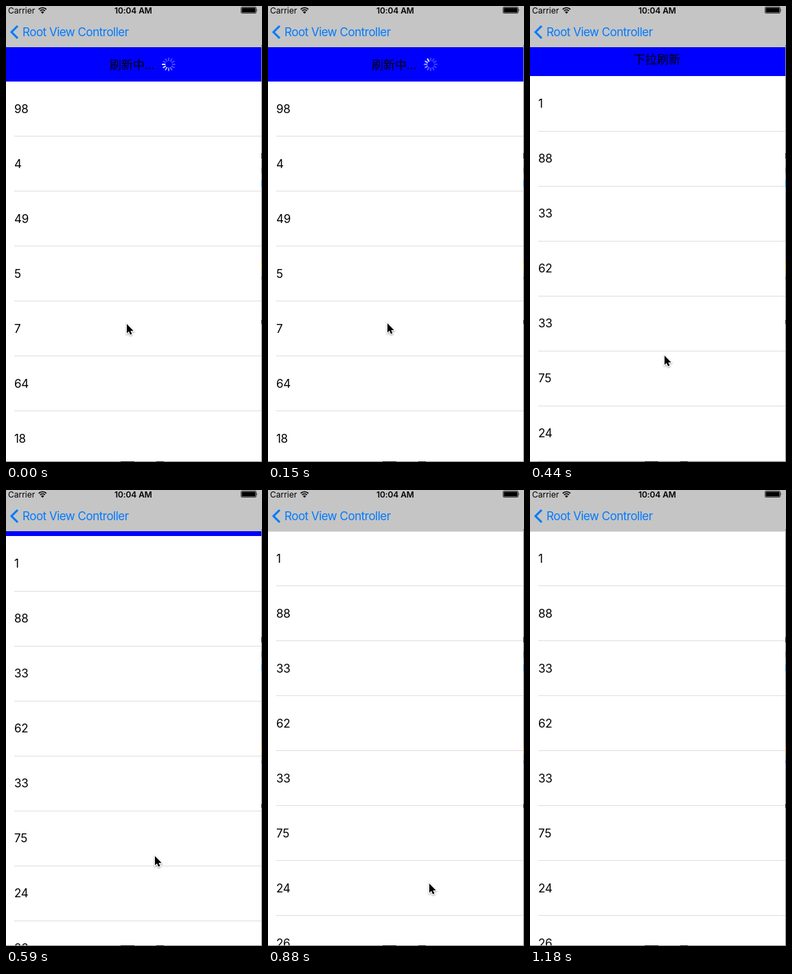
Write an HTML page that moves like this. It is 373 px wide and 664 px high and loops after 8000 ms.

```html
<!DOCTYPE html>
<html lang="en">
<head>
<meta charset="utf-8">
<title>Pull to refresh</title>
<style>
  html, body { margin: 0; width: 100%; height: 100%; overflow: hidden; }
  #stage { position: relative; width: 373px; height: 664px; overflow: hidden; background: #fff; color: #000; font: 17px/20px Inter, sans-serif; }
  #stage * { position: absolute; white-space: nowrap; box-sizing: border-box; }
  .anim, .list, .lines, .pull, .busy, .idle, .spin, .cursor { animation: 8s step-end infinite; }

  .view { left: 0; top: 60px; width: 372px; height: 603px; overflow: hidden; background: #00f; }
  .list, .lines { left: 0; top: 0; width: 372px; height: 720px; }
  .list { background: #fff; animation-name: scroll; }
  .lines { background: repeating-linear-gradient(#0000 0 79px, #dedee0 79px 80px); left: 12px; animation-name: lines; }
  .list div { left: 12px; letter-spacing: -.3px; }
  .old { animation: before 8s step-end infinite; }
  .new { animation: after 8s step-end infinite; }
  .pull { left: 0; top: -35px; width: 372px; height: 20px; animation-name: scroll; font-family: "Noto Sans CJK SC", "Noto Sans CJK", sans-serif; }
  .pull span { left: 151px; }
  .busy { animation-name: before; }
  .idle { animation-name: after; }
  .spin { left: 226px; top: -1px; width: 22px; height: 22px; animation-name: spin; }

  .nav { left: 0; top: 0; width: 373px; height: 60px; background: #c5c5c5; }
  .nav::after { content: ""; position: absolute; left: 0; top: 60px; width: 372px; height: 1px; background: #0002; }
  .back { left: 24px; top: 28px; color: #007aff; letter-spacing: -.5px; }
  .status { top: -1px; font-size: 12px; line-height: 15px; }
  .time { left: 158px; font-weight: 600; letter-spacing: -.1px; }
  .icons { left: 0; top: 0; }

  .cursor { left: 0; top: 0; overflow: visible; animation-name: move; }

  @keyframes scroll {
    0% { transform: translateY(50px); }
    5.5% { transform: translateY(42px); }
    7.375% { transform: translateY(7px); }
    9.125%, 100% { transform: none; }
  }
  @keyframes lines {
    0% { transform: translateY(50px); }
    5.5% { transform: translateY(43px); }
    7.375% { transform: translateY(8px); }
    9.125%, 100% { transform: none; }
  }
  @keyframes before { 0% { visibility: visible; } 5.5%, 100% { visibility: hidden; } }
  @keyframes after { 0% { visibility: hidden; } 5.5%, 100% { visibility: visible; } }
  @keyframes spin {
    0% { transform: rotate(270deg); }
    1.875% { transform: rotate(330deg); }
    3.625%, 100% { transform: rotate(420deg); }
  }
  @keyframes move {
    0% { transform: translate(176px, 463px); }
    1.875% { transform: translate(174px, 462px); }
    3.625% { transform: translate(175px, 462px); }
    5.5% { transform: translate(196px, 509px); }
    7.375% { transform: translate(217px, 533px); }
    11% { transform: translate(235px, 573px); }
    12.875% { transform: translate(280px, 657px); }
    14.75%, 100% { transform: translate(280px, 700px); }
  }
</style>
</head>
<body>
<div id="stage">
  <div class="view">
    <div class="list"></div>
    <div class="lines"></div>
    <div class="pull">
      <span class="busy">刷新中...</span>
      <span class="idle">下拉刷新</span>
      <div class="busy" style="left:0;top:0"><svg class="spin" viewBox="-11 -11 22 22"></svg></div>
    </div>
  </div>

  <div class="nav">
    <span class="status" style="left:3px">Carrier</span>
    <span class="status time">10:04 AM</span>
    <span class="back">Root View Controller</span>
    <svg class="icons" width="373" height="60" fill="none">
      <path d="M17 29 8 38l9 9" stroke="#007aff" stroke-width="3"/>
      <path d="M47.6 4.8a8 8 0 0 1 11.2 0M49.7 7.1a5 5 0 0 1 7 0" stroke="#000" stroke-width="1.7"/>
      <path d="M53.2 11.2 51 8.9a3.1 3.1 0 0 1 4.4 0Z" fill="#000"/>
      <rect x="342.5" y="1.5" width="22" height="9" rx="1.5" stroke="#000" stroke-width=".7"/>
      <rect x="343.5" y="2.5" width="20" height="7" rx=".6" fill="#000"/>
      <path d="M365.6 4.2q1.6 1.8 0 3.6Z" fill="#000"/>
    </svg>
  </div>

  <!-- window edge with slivers of the desktop behind it -->
  <svg style="left:0;top:0" width="373" height="664">
    <path d="M372 60h1v604H0v-1h372Z" fill="#8f8f8f"/>
    <path d="M372 214h1v8h-1ZM372 457h1v6h-1ZM167 663h20v1h-20ZM219 663h11v1h-11Z" fill="#222"/>
    <path d="M372 235h1v9h-1ZM372 394h1v4h-1Z" fill="#667"/>
    <path d="M372 57h1v2h-1ZM372 254h1v9h-1Z" fill="#1683c4"/>
    <path d="M372 374h1v10h-1Z" fill="#c79a2c"/>
  </svg>

  <svg class="cursor" width="14" height="20">
    <path d="M0 0V13.6L3 10.8 5.1 15.6 7.5 14.6 5.4 9.9H9.7Z" stroke="#fff" stroke-width="2" paint-order="stroke" style="filter:drop-shadow(0 1px 1px #0006)"/>
  </svg>
</div>
<script>
  const list = document.querySelector('.list');
  const addRows = (name, values) => values.forEach((value, i) => {
    const row = document.createElement('div');
    row.className = name;
    row.textContent = value;
    row.style.top = i * 80 + 30 + 'px';
    list.append(row);
  });
  addRows('old', [98, 4, 49, 5, 7, 64, 18]);
  addRows('new', [1, 88, 33, 62, 33, 75, 24, 26]);

  // Twelve petals fading behind the bright one
  document.querySelector('.spin').innerHTML = Array.from({ length: 12 }, (_, i) =>
    `<path d="M0-5.5V-9" stroke="#fff" stroke-width="1.9" stroke-linecap="round" opacity="${Math.max(.28, 1 - i * .14)}" transform="rotate(${-30 * i})"/>`
  ).join('');
</script>
</body>
</html>
```
